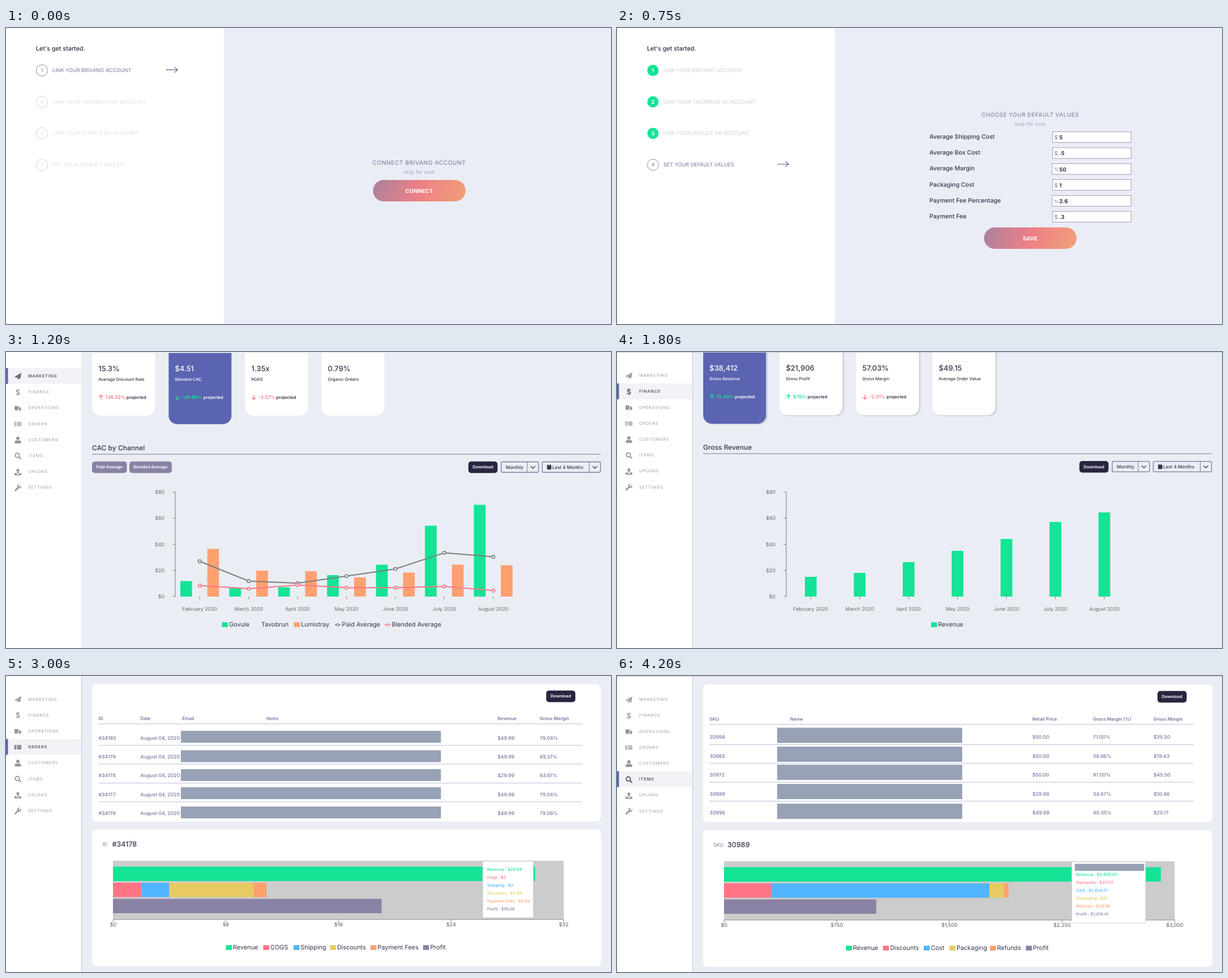
An HTML page for the animation above (4.8 s loop, 1069x524 px).

```html
<!DOCTYPE html>
<html lang="en">
<head>
<meta charset="utf-8">
<title>Store analytics tour</title>
<style>
html, body { margin: 0; height: 100%; overflow: hidden; background: #fff }
svg { display: block; width: 100vw; height: 100vh; font-family: Inter, "Open Sans", sans-serif; text-rendering: geometricPrecision }
text { white-space: pre }
</style>
</head>
<body>
<svg id="stage" viewBox="0 0 1069 524"></svg>
<script>
const C = {
  bg: '#eaeef4', ink: '#34354b', muted: '#77739b', purple: '#8a82a5', indigo: '#5b64b1',
  green: '#15e396', pink: '#ff7585', blue: '#51b6ff', yellow: '#e5cb60', orange: '#ffa071',
  redact: '#98a2b6', rule: '#bcbfda', grey: '#b0b0b4', water: '#d3d4d5', coast: '#c9cacc'
};

// Drawing helpers. Text is placed by the middle of its capitals.
const text = (x, y, s, size, fill = C.ink, weight = 400, more = '') =>
  `<text x="${x}" y="${y + size * .36}" font-size="${size}" fill="${fill}" font-weight="${weight}" ${more}>${s}</text>`;
const span = (s, fill, more = '') => `<tspan fill="${fill}" ${more}>${s}</tspan>`;
const rect = (x, y, w, h, fill, r = 0, more = '') =>
  `<rect x="${x}" y="${y}" width="${w}" height="${h}" rx="${r}" fill="${fill}" ${more}/>`;
const circle = (x, y, r, fill, more = '') => `<circle cx="${x}" cy="${y}" r="${r}" fill="${fill}" ${more}/>`;
const path = (d, stroke, width = 1, fill = 'none', more = '') =>
  `<path d="${d}" stroke="${stroke}" stroke-width="${width}" fill="${fill}" ${more}/>`;
const hline = (x1, x2, y, color = C.rule, width = 1) => path(`M${x1} ${y}H${x2}`, color, width);
const each = (list, draw) => list.map(draw).join('');
const mid = 'text-anchor="middle"', end = 'text-anchor="end"';

const defs = `<defs>
  <linearGradient id="button" x2="1" y2=".08"><stop stop-color="#a9829d"/><stop offset=".54" stop-color="#ee8085"/><stop offset="1" stop-color="#f09c7b"/></linearGradient>
  <linearGradient id="risk"><stop stop-color="#62eca6"/><stop offset=".5" stop-color="#fee172"/><stop offset=".82" stop-color="#ffa386"/><stop offset="1" stop-color="#ff8c98"/></linearGradient>
  <linearGradient id="terrain"><stop stop-color="#dddee0"/><stop offset=".4" stop-color="#e2e3e5"/><stop offset=".5" stop-color="#e7e8ea"/><stop offset="1" stop-color="#dedfe1"/></linearGradient>
  <clipPath id="face"><circle r="36.5"/></clipPath>
  <clipPath id="map"><rect x="217" y="233" width="748" height="291"/></clipPath>
</defs>`;

// Onboarding
const steps = ['LINK YOUR BRIVANO ACCOUNT', 'LINK YOUR TAVOBRUN AD ACCOUNT', 'LINK YOUR GOVULE AD ACCOUNT', 'SET YOUR DEFAULT VALUES'];

function step(label, i, active) {
  const y = 74.8 + 55.7 * i, done = i < active, now = i === active;
  const color = now ? C.muted : done ? '#c8cdda' : '#e2e7f1';
  return circle(63.5, y + .3, 10, done ? C.green : 'none', done ? '' : `stroke="${now ? '#8f8bae' : color}" stroke-width="${now ? 1 : 1.6}"`)
    + text(63.5, y + .3, i + 1, 8.8, done ? '#fff' : color, now ? 400 : 700, mid)
    + text(82, y, label, 9.1, color, now || done ? 400 : 600)
    + (now ? path(`M283 ${y - .8}h20.5m-6 -5l6 5l-6 5`, C.muted, 1.3) : '');
}

const action = (y, label) => rect(648.5, y, 163.5, 38, 'url(#button)', 19)
  + text(730, y + 19.3, label, 9.7, '#fff', 700, mid);

const heading = (y, title, size = 10.2) => text(730, y, title, size, C.muted, 400, mid + ' letter-spacing=".55"')
  + text(730, y + 16.3, 'skip for now', 8.5, '#9b9eae', 400, mid + ' letter-spacing=".45"');

const onboarding = (active, body) => rect(0, 0, 1069, 524, '#fff') + rect(385, 0, 684, 524, '#eaedf5')
  + text(53, 36.2, "Let's get started.", 10.7, '#2b2b42', 500)
  + each(steps, (s, i) => step(s, i, active)) + body;

const connect = (active, name) => onboarding(active, heading(238.7, `CONNECT ${name} ACCOUNT`) + action(269, 'CONNECT'));

const fields = [['Average Shipping Cost', '$', '5'], ['Average Box Cost', '$', '.5'], ['Average Margin', '%', '50'],
  ['Packaging Cost', '$', '1'], ['Payment Fee Percentage', '%', '2.6'], ['Payment Fee', '$', '.3']];
const defaults = onboarding(3, heading(153.2, 'CHOOSE YOUR DEFAULT VALUES', 9.8)
  + each(fields, ([label, unit, value], i) => {
    const y = 193.2 + 28.2 * i, x = unit === '$' ? 769.5 : 768.5;
    return text(552, y - 1, label, 10.6, C.ink, 500) + rect(x, y - 9.5, 908.5 - x, 19, '#fff', 0, 'stroke="#a09dbd"')
      + text(x + 3.3, y + .5, unit, unit === '$' ? 9.5 : 8.4, C.muted) + text(781.5, y + .5, value, 9.6, C.ink, 700);
  }) + action(353, 'SAVE'));

// Sidebar
const menu = [
  ['MARKETING', c => path('M6-6-6 1-2 2.3 4-4-1 3V6L1 3.5 4 4.6Z', 'none', 0, c)],
  ['FINANCE', c => text(0, 0, '$', 13, c, 600, mid)],
  ['OPERATIONS', c => path('M-6-4H1V3H-6ZM2-2H4L6 .3V3H2Z', 'none', 0, c) + circle(-3, 3, 1.6, c) + circle(3.4, 3, 1.6, c)],
  ['ORDERS', c => path('M-5.5-4V4M-3.5-4V4M-.5-4V4M1.5-4V4M3.3-4V4M5.3-4V4', c, 1.2)],
  ['CUSTOMERS', c => circle(0, -3, 3, c) + path('M-5.5 6V4Q-5.5 .8-2.5 .8H2.5Q5.5 .8 5.5 4V6Z', 'none', 0, c)],
  ['ITEMS', c => circle(-1, -1, 3.8, 'none', `stroke="${c}" stroke-width="1.8"`) + path('M1.8 1.8 5.4 5.4', c, 2.2)],
  ['UPLOAD', c => path('M0-6 4-2H1.5V2.5H-1.5V-2H-4ZM-6 2H-2.5V4H2.5V2H6V6H-6Z', 'none', 0, c)],
  ['SETTINGS', c => path('M-4.5 4.5 1-1', c, 2.8, 'none', 'stroke-linecap="round"') + path('M5-3A2.6 2.6 0 1 1 2.8-5', c, 2)]
];

function page(active, shift, body, topLine = true) {
  const items = each(menu, ([label, icon], i) => {
    const y = 41 + shift + 28.2 * i, on = i === active;
    return (on ? rect(0, y - 14, 133, 28, '#f2f3f6') + rect(0, y - 14, 3.5, 28, C.indigo) : '')
      + `<g transform="translate(21 ${y + .6})">${icon(on ? '#55566a' : '#97979b')}</g>`
      + text(39, y, label, 7.3, on ? '#55566a' : '#aaaaae', on ? 600 : 500, 'letter-spacing=".8"');
  });
  return rect(0, 0, 1069, 524, C.bg) + body + rect(0, 0, 133, 524, '#fff') + items
    + (topLine ? hline(0, 1069, .5, '#c8cbe0') : '')
    + (active ? path('M133.7 0V524', '#c3c6df') : '');
}

// Dashboard parts
const download = (x, y) => rect(x, y, 51.5, 20.5, '#27253f', 5)
  + text(x + 25.7, y + 10, 'Download', 7.5, '#fff', 600, mid);

const select = (x, y, w, label, inset) => rect(x, y, w, 18.5, 'none', 2.5, 'stroke="#7b78a0" stroke-width="1.3"')
  + path(`M${x + w - 20} ${y}v18.5`, '#7b78a0') + path(`M${x + w - 14} ${y + 7.5}l4 4 4-4`, C.ink, 1.3)
  + text(x + inset, y + 9.2, label, 8.1, C.ink, 500);

const period = y => select(947.5, y, 103, 'Last 4 Months', 17.5)
  + rect(956, y + 6, 7.5, 7.5, C.ink, 1) + path(`M957.7 ${y + 4.5}v2m4-2v2`, C.ink, 1.2);

const cards = (list, chosen, y, shadow) => each(list, ([value, label, arrow, pct, color], i) => {
  const x = 152.3 + 135.1 * i, on = i === chosen, h = on ? 157 : 142, ink = on ? '#fff' : C.ink;
  return (shadow ? rect(x + 3, y - 30 + 2, 111, h, '#d3d5dc', 15) : '')
    + rect(x, y - 30, 111, h, on ? C.indigo : '#fff', 15)
    + text(x + 11, y + 28.5, value, 13, ink, 500) + text(x + 11, y + 47.5, label, 7.5, ink, 500)
    + (pct ? path(`M${x + 15.5} ${y + 75.5}v8m-3.5${arrow === 'up' ? '-4.5l3.5-3.5 3.5 3.5' : '-3.5l3.5 3.5 3.5-3.5'}`, color, 1.3)
      + text(x + 23.5, y + 79.5, span(pct, color) + span(' projected', ink, 'font-size="7.6"'), 8.3, ink, 600) : '');
});

const section = (title, y) => text(152, y, title, 12, C.ink, 500) + hline(152, 1051, y + 11.5, '#7c7aa0', 1.2);

// Monthly chart
const months = ['February', 'March', 'April', 'May', 'June', 'July', 'August'];
const monthX = i => 342.3 + 86.45 * i;
const bars = (tops, dx, color) => each(tops, (y, i) => rect(monthX(i) + dx, y, 20.7, 433 - y, color));
const trend = (ys, color) => path('M' + ys.map((y, i) => `${monthX(i)} ${y}`).join('L'), color, 2)
  + each(ys, (y, i) => circle(monthX(i), y, 2.7, '#fff', `stroke="${color}" stroke-width="1.7"`));
const axes = path('M294.5 248H299V433H294.5M294.5 294.2h4.5m-4.5 46.3h4.5m-4.5 46.2h4.5', '#777')
  + each([80, 60, 40, 20, 0], (v, i) => text(280, 248 + 46.25 * i, '$' + v, 8.9, '#666', 400, end))
  + each(months, (m, i) => path(`M${monthX(i)} 433v4.5`, '#777') + text(monthX(i), 455, m + ' 2020', 8.8, '#666', 400, mid));
const key = (x, y, label, color, line) => (line
  ? path(`M${x} ${y + .8}h10.5`, color, 1.6) + circle(x + 5.2, y + .8, 1.9, '#fff', `stroke="${color}" stroke-width="1.3"`)
  : rect(x, y - 3.5, 10.5, 8.5, color)) + text(x + 12.5, y, label, 10.9);

const pill = (x, w, label) => rect(x, 193.7, w, 20.6, C.purple, 5) + text(x + w / 2, 203.7, label, 7.3, '#fff', 600, mid);
const marketing = page(0, 1.4,
  cards([['15.3%', 'Average Discount Rate', 'up', '138.32%', C.pink], ['$4.51', 'Blended CAC', 'down', '-40.66%', C.green],
    ['1.35x', 'ROAS', 'down', '-3.57%', C.pink], ['0.79%', 'Organic Orders']], 1, .7)
  + rect(133, 0, 936, 1.7, C.bg)
  + section('CAC by Channel', 169.5) + pill(152, 61.5, 'Paid Average') + pill(218, 75, 'Blended Average')
  + download(817, 193.7) + select(875, 194.5, 66, 'Monthly', 8) + period(194.5) + axes
  + bars([405.5, 417, 416.5, 395, 376.5, 307.5, 270.5], -34.3, C.green)
  + bars([348.5, 387, 388, 399, 390.5, 376.3, 377.5], 13.4, C.orange)
  + trend([370.5, 405.5, 409.3, 396.7, 384, 355.5, 362.5], '#7d7d7d')
  + trend([413.5, 419, 412.5, 417.3, 417.2, 415, 422.3], C.pink)
  + key(381.5, 482, 'Govule', C.green) + key(438.5, 482, 'Tavobrun', 'none') + key(508.7, 482, 'Lumistray', C.orange)
  + key(581, 482, 'Paid Average', '#7d7d7d', 1) + key(669, 482, 'Blended Average', C.pink, 1), false);

const finance = page(1, .5,
  cards([['$38,412', 'Gross Revenue', 'up', '12.40%', C.green], ['$21,906', 'Gross Profit', 'up', '8.15%', C.green],
    ['57.03%', 'Gross Margin', 'down', '-2.31%', C.pink], ['$49.15', 'Average Order Value']], 0, 0, true)
  + section('Gross Revenue', 168.5) + download(817, 193) + select(875, 193.7, 66, 'Monthly', 8) + period(193.7) + axes
  + bars([398, 391, 372, 352, 331, 301, 284], -10.3, C.green)
  + key(555, 482, 'Revenue', C.green));

// Region map
const states = `WASH. 391 262,MONT. 483 274,N.D. 557 269,MINN. 610 283,ORE. 391 310,IDAHO 438 306,WYO. 497 316,S.D. 559 300,WIS. 647 302,MICH. 692 300,
NEBR. 562 335,IOWA 615 333,NEV. 421 356,UTAH 463 365,COLO. 514 365,ILL. 653 354,IND. 677 357,OHIO 708 352,MO. 623 376,KY. 685 383,CALIF. 395 388,
ARIZ. 464 418,N.M. 510 416,OKLA. 581 400,ARK. 625 408,TENN. 680 399,MISS. 647 432,ALA. 673 432,GA. 702 437,TEX. 570 442,LA. 626 450,FLA. 713 470,
VA. 742 381,N.C. 735 404,S.C. 722 421,PA. 744 344,N.Y. 767 325,MAINE 820 294,ONT. 693 243`.split(',');
const cities = [['Ottawa', 766, 299], ['Toronto', 735, 320], ['Chicago', 665, 341], ['Boston', 806, 323], ['New York', 780, 353],
  ['San', 371, 365], ['Francisco', 371, 375], ['Los Angeles', 407, 425], ['Phoenix', 459, 431], ['Houston', 600, 467],
  ['Atlanta', 693, 416], ['Bahamas', 759, 505], ['United States', 578, 363, 9.3], ['Mexico', 539, 517, 9.3]];
const spots = [[386, 265], [397, 391, 44.5], [512, 361], [562, 441], [650, 349], [683, 307], [778, 318, 40.5], [802, 329],
  [753, 343], [789, 340], [777, 356], [741, 384], [738, 402], [705, 438], [717, 482]];
const canada = `M300 233 318 246 340 250 357 268 500 300 720 345 812 330 832 304 862 285 846 272 815 272 842 250 862 233Z
M846 302 868 287 893 276 886 289 862 306ZM880 233 905 233 958 262 948 268 925 260 930 272 900 252Z`;
const mexico = 'M416 438 425 465 447 500 455 524H475L446 480 430 446 452 478 482 524H562L556 492 535 470 510 440Z';
const usa = `M357 268 364 248H625L640 262 664 275 700 298 718 309 706 339 744 324 766 309 790 294 805 284 820 268 832 304 809 324 812 335 800 345
776 354 761 372 749 386 752 405 736 424 713 443 716 462 727 490 722 503 711 500 700 481 688 464 672 456 647 460 653 470 642 472 624 465
598 462 575 474 556 492 535 470 510 440 484 440 445 446 416 438 396 430 374 404 360 375 352 345 357 318Z`;
const lakes = 'M625 281Q650 255 690 276Q660 283 625 281ZM664 338Q657 305 679 289Q674 320 676 340ZM690 287Q720 285 718 309Q703 322 700 302ZM702 339Q722 325 744 324Q720 340 702 339ZM733 316Q750 306 766 310Q752 319 733 316Z';
const borders = `M357 296 405 290M357 335H484M413 248V290L432 313V335M450 248 475 296H530M530 248V380M474 290V348H545M530 285H590M530 318H588
M545 345H595M400 335V370L440 415M440 335V400M484 348V440M440 380H710M535 380V435M545 390H612M590 248 596 310 608 350 612 395V425M596 316H640
M604 346H640M640 316 644 358 660 380 648 400 634 455M668 342V378M694 342V360L712 372M662 404H740M660 404V457M686 404 692 448M708 403 728 428
M728 338V358H768M718 370 752 388M768 338 774 355M790 294 796 335M805 286 812 322M470 233V248M548 233V248M632 233 640 262`;
const regionMap = `<g clip-path="url(#map)">` + rect(217, 233, 748, 291, C.water)
  + path(canada + mexico, C.coast, .8, '#dcddde') + path(usa, C.coast, .8, 'url(#terrain)') + path(lakes, C.coast, .6, C.water)
  + path(borders, '#c9cbce', .8, 'none', 'stroke-dasharray="3 1"')
  + each(states, s => { const [name, x, y] = s.trim().split(' '); return text(x, +y, name, 6.2, '#8f9297', 500, mid + ' letter-spacing=".7"'); })
  + each(cities, ([name, x, y, size = 7.3]) => text(x, y, name, size, '#515459', 500, mid))
  + each(spots, ([x, y, r = 18.5]) => circle(x, y, r, '#4db6fb', 'opacity=".56"'))
  + circle(230, 516, 7.5, '#fff') + text(239, 516, 'plenor', 12, '#fff', 700) + '</g>';

const operations = page(2, .6,
  cards([['0.36%', 'Order refund rate', 'down', '-74.10%', C.green], ['$4,234.10', 'Abandoned Checkouts', 'up', '68.21%', C.grey],
    ['$2.00', 'Average Fullfillment Cost', 'down', '0.00%', C.grey], ['25,631', 'Top Seller Orders'], ['CA, US', 'Top Selling Region']], 4, -.2, true)
  + section('Top 15 Regions', 168.5) + download(890, 193) + period(193.7) + regionMap);

// Tables and stacked breakdowns
const panel = (x, y, w, h, r = 8) => rect(x, y, w, h, '#fff', r);
const tableRow = (cols, cells, y, size, weight) => each(cells, (s, i) => text(cols[i], y, s, size, C.muted, weight));
const header = (cols, names, y) => tableRow(cols, names, y, 8, 600);

function breakdown({ y, label, id, idX, max, parts, keys, tip }) {
  const scale = 796 / max, colors = [C.green, C.pink, C.blue, C.yellow, C.orange, C.purple];
  let x = 189;
  const blocks = each(parts, ([, value], i) => {
    const w = value * scale, row = i === 0 ? 0 : i === 5 ? 2 : 1;
    const block = rect(row === 1 ? x : 189, y + 65.5 + 28.5 * row, w, 25.5, colors[i]);
    if (row === 1) x += w;
    return block;
  });
  const money = v => '$' + v.toLocaleString('en-US', { minimumFractionDigits: v % 1 ? 2 : 0 });
  return panel(152, y, 899.5, 241.5) + text(170.5, y + 26, label, 8.6, C.muted) + text(idX, y + 25, id, 12.5, C.ink, 500)
    + rect(189, y + 55, 796.5, 104, '#ccc') + blocks
    + path(`M189 ${y + 159}H985.5` + each([0, 1, 2, 3, 4], i => `M${189.3 + 199 * i} ${y + 159}v4.5`), '#888')
    + each([0, 1, 2, 3, 4], i => text(189.5 + 199 * i, y + 168, money(max / 4 * i), 9, '#55566a', 400, mid))
    + each(parts, ([name], i) => key(keys[i], y + 208, name === 'Cogs' ? 'COGS' : name, colors[i]))
    + rect(tip.x, y + 56, tip.w, tip.h, '#fff', 0, 'stroke="#d0d0d0"')
    + (tip.redacted ? rect(809, y + 59.5, 122.5, 12.5, C.redact) : '')
    + each(parts, ([name, value], i) => text(tip.x + 7.6, tip.y + 14.1 * i, `${name} : ${money(value)}`, 7.35, colors[i], 500));
}

const orderCols = [163.5, 237.5, 311.5, 460, 868.5, 943];
const orderNames = ['ID', 'Date', 'Email', 'Items', 'Revenue', 'Gross Margin'];
const orders = page(3, -.1, panel(152, 14.5, 899, 243) + download(954.5, 25.7) + header(orderCols, orderNames, 75.5)
  + each([84.7, 122.8, 156, 189.5, 222.8], y => hline(163, 1018, y))
  + each([79.06, 69.31, 63.61, 79.06, 79.06], (margin, i) =>
    tableRow(orderCols, ['#' + (34180 - i), 'August 04, 2020', '', '', i === 2 ? '$29.99' : '$49.99', margin + '%'], 109.5 + 33.4 * i, 8.7, 500))
  + each([97, 131.5, 165, 197, 231], y => rect(309, y, 459.5, 21, C.redact))
  + breakdown({
    y: 272, label: 'ID', id: '#34178', idX: 187.5, max: 32,
    parts: [['Revenue', 29.99], ['Cogs', 2], ['Shipping', 2], ['Discounts', 5.99], ['Payment Fees', .92], ['Profit', 19.08]],
    keys: [388.5, 454.5, 508, 572.5, 644, 737], tip: { x: 842.3, w: 89.5, h: 100, y: 342 }
  }), false);

const itemCols = [163.5, 306, 734, 841, 948];
const itemRows = [['30958', '50.00', '71.00', '35.50'], ['30965', '50.00', '38.86', '19.43'], ['30972', '50.00', '91.00', '45.50'],
  ['30989', '29.99', '34.87', '10.46'], ['30996', '49.99', '40.35', '20.17']];
const items = page(5, .6, panel(152, 15, 900, 243.5) + download(955, 26.5)
  + header(itemCols, ['SKU', 'Name', 'Retail Price', 'Gross Margin (%)', 'Gross Margin'], 76.3)
  + each([85.5, 121.5, 154.7, 188, 221.5], y => hline(163, 1019, y))
  + each(itemRows, ([sku, price, pct, margin], i) => tableRow(itemCols, [sku, '', '$' + price, pct + '%', '$' + margin], 108 + 33.5 * i, 8.7, 500))
  + each([91.5, 125, 157, 191, 226], y => rect(283, y, 327, 27, C.redact))
  + breakdown({
    y: 273, label: 'SKU', id: '30989', idX: 195, max: 3000,
    parts: [['Revenue', 2909.03], ['Discounts', 313.11], ['Cost', 1454.51], ['Packaging', 97], ['Refunds', 29.99], ['Profit', 1014.41]],
    keys: [404.5, 470, 542, 587.5, 659, 722.5], tip: { x: 803.5, w: 130.5, h: 108, y: 351, redacted: true }
  }));

// Customer profile
const avatar = (x, y, scale) => `<g transform="translate(${x} ${y}) scale(${scale})" clip-path="url(#face)">`
  + circle(0, 0, 36.5, C.indigo) + path('M-21 26Q-17-27 1-27Q20-27 21 26Z', 'none', 0, '#3d3d45')
  + path('M-22 40Q-22 25-6 23H6Q22 25 22 40Z', 'none', 0, '#f5a96b') + path('M-6 12H6V23Q0 30-6 23Z', 'none', 0, '#f3cfb8')
  + path('M-14-6Q-6-9 0-18Q8-8 14-6Q15 18 0 19Q-15 18-14-6Z', 'none', 0, '#fde7d8') + '</g>';
const person = 'Nevan Durat', product = 'The Mordlay';
const caps = (x, s) => text(x, 259.3, s, 6.6, '#55566a', 600, 'letter-spacing=".6"');

const customers = page(4, .5, rect(152, 16, 900, 41, '#e0e4ee', 20.5) + panel(152, 15, 899, 40, 20)
  + circle(173.5, 34.5, 6, 'none', 'stroke="#8d8d98"') + path('M178 39l3.5 3.5', '#8d8d98')
  + rect(192, 23.5, 65.5, 19.5, C.redact) + text(258, 35, '@mail.test', 12, '#111')
  + circle(1030, 35, 5.8, '#333') + path('M1028 33l4 4m0-4l-4 4', '#fff', 1.5)
  + panel(152, 67, 444, 269.5) + path('M152 269H596V328.5Q596 336.5 588 336.5H160Q152 336.5 152 328.5Z', 'none', 0, '#f5f6f8')
  + avatar(211.5, 125.5, 1) + text(263, 108.3, person, 13.4, '#111', 500)
  + rect(263.5, 124.5, 12, 9, '#333', 1) + path('M263.5 126.5l6 4 6-4', '#fff')
  + rect(279.5, 119.5, 136, 20.5, C.redact)
  + circle(269.3, 146, 3, '#333') + path('M269.3 148v7', '#333', 1.5) + text(284, 150.5, 'San Francisco, CA', 11.7, '#2b2b33')
  + avatar(216.8, 210, .29) + path('M217 222.5v12', '#999')
  + text(233.5, 205.5, 'Last Purchase', 7.8, C.muted) + text(233.5, 214.8, '25 days ago', 9.7, '#222')
  + rect(174.5, 237.3, 399.5, 13.3, 'url(#risk)', 6.6) + caps(182, 'ACTIVE') + caps(364, 'AT RISK') + caps(546, 'LOST')
  + text(174.5, 291, 'Total Spent', 8, C.muted) + text(395.5, 291, 'Orders', 8, C.muted)
  + text(174.5, 311, '$29.99', 18.3, C.ink, 500, 'letter-spacing=".7"') + text(395, 311, '1', 18.3, C.ink, 500)
  + panel(608, 67, 443.5, 269.5) + text(630, 103.3, 'Customer Timeline', 9.6, '#111', 500)
  + circle(634.7, 144.5, 4.6, C.green)
  + text(648, 140.5, person + span(' ordered ', '#999') + product + span(' (1)', '#999'), 9.8, '#222', 500)
  + circle(653, 156.5, 3.8, 'none', 'stroke="#999"') + path('M653 154v2.8h2', '#999')
  + text(660, 157.3, 'July 10, 2020 - 15:07pm -0700', 8.8, '#999')
  + panel(152, 348.5, 899.5, 190) + header(orderCols, orderNames, 366.5) + hline(163, 1051, 375.8) + hline(163, 1051, 402.5)
  + tableRow(orderCols, ['#31931', 'July 10, 2020', 'nevand482@mail.test', product + ' - 6 pack', '$29.99', '83.06%'], 389.3, 8.7, 500));

// Timeline: hard cuts between scenes
const scenes = [[0, connect(0, 'BRIVANO')], [250, connect(1, 'TAVOBRUN')], [500, connect(2, 'GOVULE ADSPACE')], [750, defaults],
  [1000, page(0, 1.4, '', false)], [1200, marketing], [1800, finance], [2400, operations], [3000, orders], [3600, customers], [4200, items]];
const loop = 4800;
const stage = document.getElementById('stage');
stage.innerHTML = defs + each(scenes, ([, markup]) => `<g class="scene" visibility="hidden">${markup}</g>`);
const groups = stage.querySelectorAll('.scene');

const origin = performance.now();
function draw(now) {
  const t = Math.max(0, now - origin) % loop;
  const current = scenes.findLastIndex(([start]) => t >= start);
  groups.forEach((g, i) => g.setAttribute('visibility', i === current ? 'visible' : 'hidden'));
  requestAnimationFrame(draw);
}
draw(origin);
</script>
</body>
</html>
```
